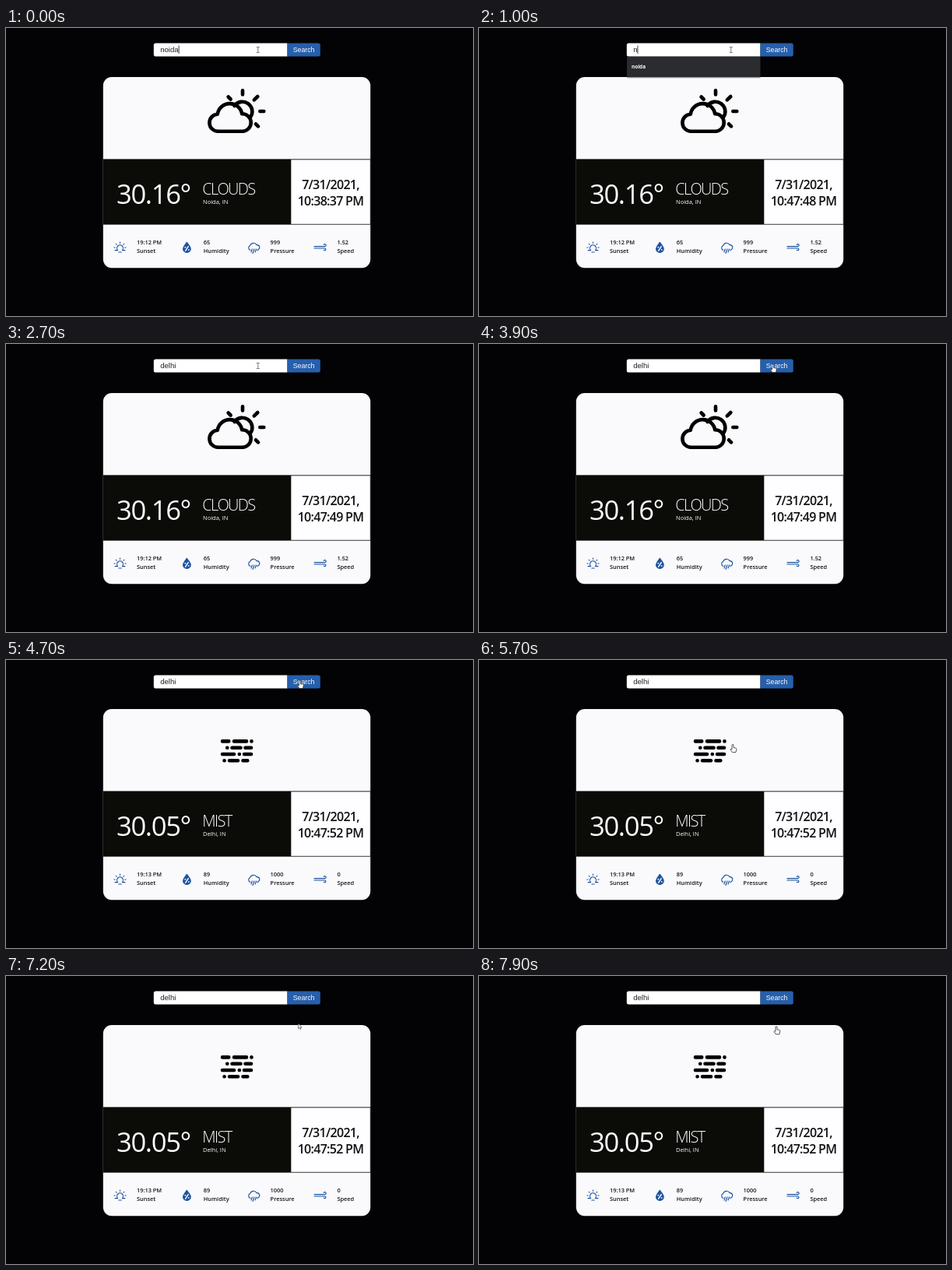
Animation, 600 px wide and 370 px high, one loop 8000 ms. Source, as an HTML page:

```html
<!DOCTYPE html>
<html lang="en">
<head>
<meta charset="utf-8">
<title>Weather search</title>
<style>
  html, body { margin: 0; width: 100%; height: 100%; overflow: hidden; background: #030204; }
  svg { display: block; width: 600px; height: 370px; font-family: "Open Sans", "Noto Sans", sans-serif; }
  .arial { font-family: "Liberation Sans", Arial, sans-serif; }
  .line { fill: none; stroke-linecap: round; stroke-linejoin: round; }
  .big { stroke: #000; stroke-width: 4.6; }
  .small { stroke: #1f55a0; stroke-width: 1.15; }
  .temp { font-size: 34.5px; font-weight: 400; letter-spacing: -1.3px; }
  .sky { font-size: 20px; font-weight: 300; letter-spacing: -1.6px; }
  .city { font-size: 7.5px; font-weight: 500; }
  .date { font-size: 16px; font-weight: 600; letter-spacing: -.7px; text-anchor: middle; }
  .stats { font-size: 7.4px; font-weight: 600; }
</style>
</head>
<body>
<svg viewBox="0 0 600 370">
  <rect x="124.8" y="63" width="343.4" height="245.3" rx="11" fill="#faf9fc"/>
  <rect x="124.8" y="168.4" width="343.4" height="84.2" fill="#0b0b08"/>
  <rect x="366.3" y="169.3" width="101.5" height="82.5" fill="#fefdff"/>

  <g id="clouds" class="line big">
    <path d="M273 132.7H303.8A11.2 11.2 0 0 0 303.2 110.3A15.9 15.9 0 0 0 271.8 110.7A11 11 0 0 0 273 132.7Z"/>
    <path d="M293.5 100A12.4 12.4 0 0 1 314 114.6M304 80.3V85.5M318.8 92.3L323.3 88M326.3 107H331.3M321 123.3L324 126.3M285.6 88.5L288.6 91.5"/>
  </g>
  <g id="mist" class="line big">
    <path d="M278 104.4H286.2M293 104.4H309M315.4 104.4h.1M284.2 112.7h.1M290.5 112.7H301.5M307.5 112.7H315M278 121H293M299.8 121h.1M306 121H315M280.5 129.2h.1M287 129.2H298M304.5 129.2H310.3"/>
  </g>

  <g fill="#fff">
    <text id="temp" class="temp" x="142" y="225.5"></text>
    <text id="sky" class="sky" x="252.3" y="213.7"></text>
    <text id="city" class="city" x="253" y="226"></text>
  </g>
  <g class="date" fill="#111">
    <text x="417" y="207">7/31/2021,</text>
    <text id="clock" x="417" y="227.5"></text>
  </g>

  <g id="stats" class="stats" fill="#151515"></g>

  <g class="line small">
    <path d="M143.6 285.6A4 4 0 1 1 149.4 285.6H153M143.6 285.6H140M146.5 275V276.3M141.2 277.3L142.1 278.2M151.8 277.3L150.9 278.2M138.9 282H140.2M152.8 282H154.1M144.8 288H148.2"/>
    <path d="M232.3 275.3C230.8 278 227.6 280.8 227.6 284A4.8 4.5 0 0 0 237.2 284C237.2 280.8 234 278 232.3 275.3Z" fill="#1f55a0"/>
    <path d="M234.2 280.6L230.6 286.2M230 281.8h.6M234.4 285h.6" stroke="#fff" stroke-width="1.4"/>
    <path d="M314 285.5A3.2 3.2 0 0 1 313.8 279.4A4.5 4.5 0 0 1 322 278.6A3.4 3.4 0 0 1 322.6 285.4M316.3 284L315 288M318.9 284L317 289.5M321.4 284L320 288"/>
    <path d="M396 280.6H409.8A1.5 1.5 0 1 0 408.3 278.4M396 283H409.6A1.4 1.4 0 1 1 408.3 285.2"/>
  </g>

  <path d="M361.5 19.5H192.3a2.5 2.5 0 0 0-2.5 2.5V34a2.5 2.5 0 0 0 2.5 2.5H361.5Z" fill="#fff"/>
  <path d="M361.5 19.5H401.3a2.5 2.5 0 0 1 2.5 2.5V34a2.5 2.5 0 0 1-2.5 2.5H361.5Z" fill="#265fab"/>
  <text class="arial" x="382.6" y="31" font-size="8.7" fill="#fff" text-anchor="middle">Search</text>
  <text id="query" class="arial" x="198.2" y="31" font-size="9.6" fill="#222"></text>
  <rect id="caret" y="22.5" width=".8" height="10.5" fill="#111"/>
  <g id="hint">
    <rect x="190" y="63" width="171.5" height="1.6" fill="#000" opacity=".2"/>
    <rect x="190" y="37" width="171.5" height="26.3" fill="#2b2c2f"/>
    <text x="196" y="52.3" font-size="6.4" font-weight="700" fill="#fff">noida</text>
  </g>

  <g id="pointer">
    <path id="beam" class="line" d="M-1.6 -3.5H-.4L0 -3.1L.4 -3.5H1.6M0 -3.1V3.1M-1.6 3.5H-.4L0 3.1L.4 3.5H1.6" stroke="#555" stroke-width=".8"/>
    <path id="hand" d="M-1 .9A1 1 0 0 1 1 .9V4L3.9 4.6Q5 5 4.8 6.1L4 10H-.6L-3 6.6Q-2.7 5.1 -1 6.4Z" fill="#fff" stroke="#222" stroke-width=".75" stroke-linejoin="round"/>
    <path id="arrow" d="M0 0V6.6L1.5 5.3L2.5 7.6L3.5 7.1L2.5 5H4.6Z" fill="#fff" stroke="#333" stroke-width=".6"/>
  </g>
</svg>
<script>
const LOOP = 8000, STEP = 100;
const $ = id => document.getElementById(id);
const show = (id, on) => $(id).setAttribute("display", on ? "inline" : "none");
const write = (el, s) => { if (el.textContent !== s) el.textContent = s; };

const typing = [
  [0, "noida"], [300, "noid"], [500, "noi"], [700, "no"], [900, "n"], [1200, ""],
  [1300, "d"], [1500, "de"], [1700, "del"], [1900, "delh"], [2200, "delhi"]
];
const clock = [[0, "38:37"], [300, "47:47"], [700, "47:48"], [1900, "47:49"], [4500, "47:52"]];
const reports = [
  [0, { temp: "30.16°", sky: "CLOUDS", city: "Noida, IN", stats: ["19:12 PM", "65", "999", "1.52"] }],
  [4500, { temp: "30.05°", sky: "MIST", city: "Delhi, IN", stats: ["19:13 PM", "89", "1000", "0"] }]
];
// time, x, y of the pointer tip
const path = [
  [2900, 323.8, 28], [3700, 377.5, 26.5], [4700, 377.5, 26.5], [5500, 326, 108.5],
  [5800, 326, 108.5], [6300, 373, 64], [6500, 375.5, 61], [7200, 375.5, 61], [7800, 382, 64.8]
];

const labels = ["Sunset", "Humidity", "Pressure", "Speed"];
const values = labels.map((label, i) => {
  const add = (s, y) => {
    const t = document.createElementNS("http://www.w3.org/2000/svg", "text");
    t.setAttribute("x", 168 + 85.8 * i);
    t.setAttribute("y", y);
    t.textContent = s;
    return $("stats").appendChild(t);
  };
  add(label, 289);
  return add("", 278);
});

const latest = (steps, t) => steps.filter(s => s[0] <= t).pop();

function pointerAt(t) {
  const i = path.findIndex(p => p[0] > t);
  if (i === 0) return path[0].slice(1);
  if (i < 0) return path[path.length - 1].slice(1);
  const [t0, x0, y0] = path[i - 1], [t1, x1, y1] = path[i];
  const u = (t - t0) / (t1 - t0), k = u * u * (3 - 2 * u);
  return [x0 + (x1 - x0) * k, y0 + (y1 - y0) * k];
}

function draw(t) {
  const [typedAt, query] = latest(typing, t);
  write($("query"), query);
  const blinkOn = Math.floor((t - typedAt) / 500) % 2 === 0;
  $("caret").setAttribute("x", 198.2 + $("query").getComputedTextLength());
  show("caret", blinkOn && t < 3800);
  show("hint", t >= 300 && t < 1200);

  const report = latest(reports, t)[1];
  for (const id of ["temp", "sky", "city"]) write($(id), report[id]);
  values.forEach((v, i) => write(v, report.stats[i]));
  show("clouds", report.sky === "CLOUDS");
  show("mist", report.sky === "MIST");
  write($("clock"), `10:${latest(clock, t)[1]} PM`);

  const [x, y] = pointerAt(t);
  const inBar = y < 37;
  const shape = inBar && x < 361 ? "beam" : inBar || y > 63 ? "hand" : "arrow";
  $("pointer").setAttribute("transform", `translate(${x} ${y})`);
  for (const id of ["beam", "hand", "arrow"]) show(id, id === shape);
}

const start = performance.now();
function tick() {
  const t = (performance.now() - start) % LOOP;
  draw(Math.floor(t / STEP) * STEP);
  requestAnimationFrame(tick);
}
tick();
</script>
</body>
</html>
```
